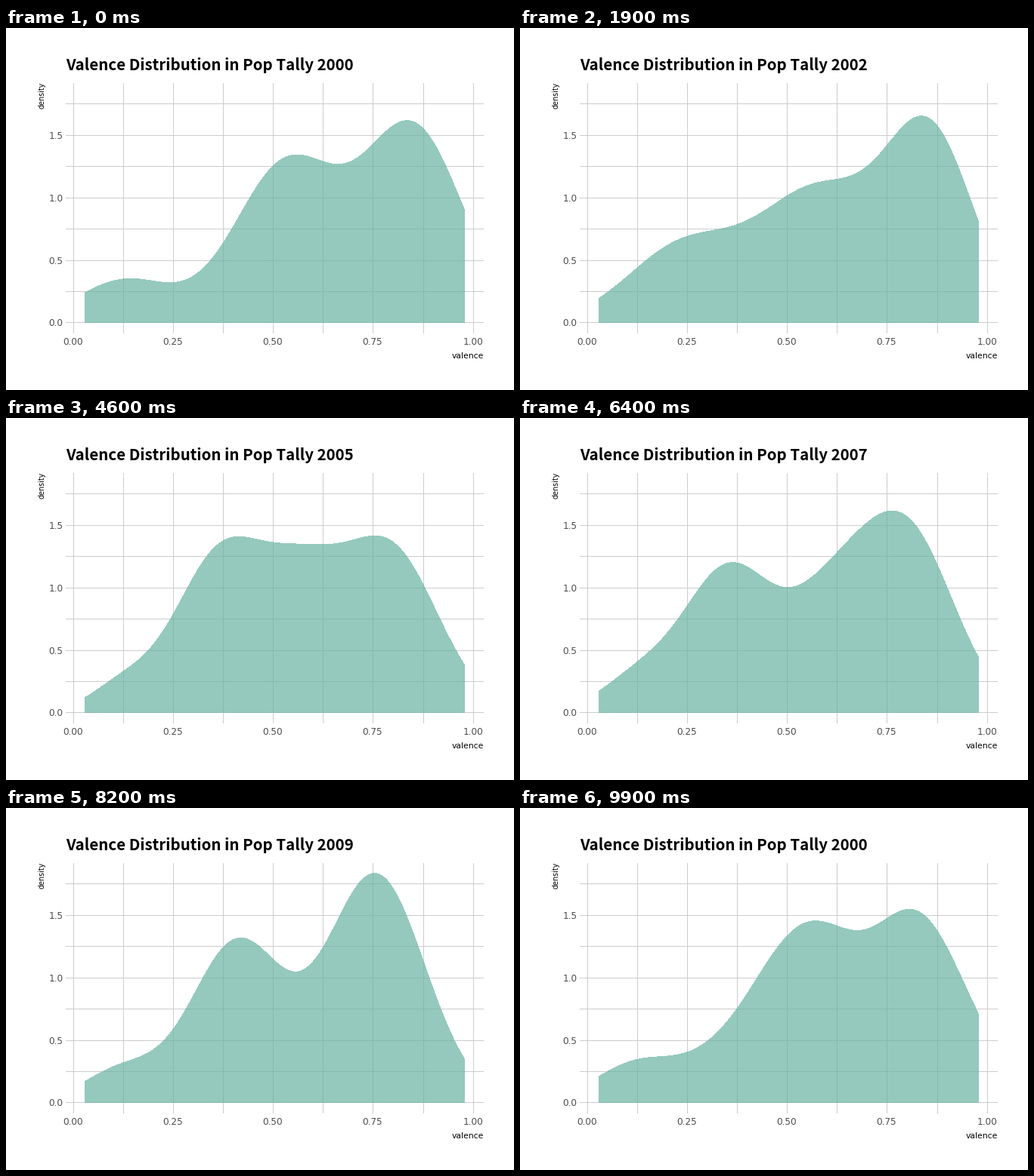
Recreate the animation shown at these times as a matplotlib script. Size 672x480 px, loop 10000 ms.

```python
import numpy as np
import matplotlib.pyplot as plt
from matplotlib.animation import FuncAnimation
from matplotlib.patches import Polygon

W, H, DPI = 672, 480, 100
FRAMES, INTERVAL = 100, 100
X0, X_UNIT = 89.2, 529.0      # pixel of valence 0, pixels per unit
Y0, Y_UNIT = 390.7, 165.7     # pixel of density 0, pixels per unit
TITLE_FONT, LABEL_FONT = "Noto Sans CJK JP", "DejaVu Sans"

# Each density is a sum of bell curves: (height, centre, width)
BELLS = {
    2000: [(.34, .13, .12), (1.27, .535, .13), (1.54, .85, .123)],
    2001: [(.55, .25, .09), (1.2, .56, .14), (1.4, .84, .115)],
    2002: [(.60, .24, .14), (1.04, .58, .15), (1.44, .858, .108)],
    2004: [(.26, .14, .095), (.60, .36, .095), (1.43, .63, .14), (.98, .85, .12)],
    2005: [(.20, .12, .08), (1.26, .37, .115), (.83, .575, .10), (1.3, .79, .12)],
    2007: [(.28, .13, .095), (1.11, .35, .108), (.85, .61, .115), (1.35, .805, .115)],
    2009: [(.26, .12, .095), (1.28, .41, .115), (1.82, .756, .122)],
    2010: [(.17, .11, .07), (.88, .36, .13), (1.58, .60, .115), (1.1, .80, .085)],
}
VALENCE = np.linspace(.028, .978, 512)


def density(year):
    """Sum of bells; years without their own lie midway between neighbours."""
    if year not in BELLS:
        return (density(year - 1) + density(year + 1)) / 2
    return sum(h * np.exp(-((VALENCE - c) / s) ** 2 / 2) for h, c, s in BELLS[year])


YEARS = range(2000, 2011)
DENSITIES = [density(year) for year in YEARS]
STARTS = [5, 15, *range(25, 98, 9)]


def state_at(frame):
    """Density curve and nearest year for a frame."""
    i = int(np.searchsorted(STARTS, frame, side="right")) - 1
    if i < 0:
        return DENSITIES[0], YEARS[0]
    steps = 5 if i < 2 else 4
    t = min(1.0, (frame - STARTS[i] + 1) / steps)
    nxt = (i + 1) % len(YEARS)
    curve = (1 - t) * DENSITIES[i] + t * DENSITIES[nxt]
    return curve, YEARS[nxt if t >= 0.5 else i]


fig = plt.figure(figsize=(W / DPI, H / DPI), dpi=DPI, facecolor="white")
ax = fig.add_axes([0, 0, 1, 1])
ax.set(xlim=(0, W), ylim=(H, 0))
ax.axis("off")


def label(x, y, text, px, color="black", font=LABEL_FONT, **kw):
    return ax.text(x, y, text, fontsize=px * 72 / DPI, color=color,
                   fontfamily=font, va="baseline", **kw)


def grid_line(xs, ys):
    ax.plot(xs, ys, color="#cccccc", lw=72 / DPI, snap=False,
            solid_capstyle="butt", zorder=1)


for i in range(9):
    x = int(X0 + X_UNIT * i / 8) + 0.5
    grid_line([x, x], [73, 405])
    if i % 2 == 0:
        label(x - 0.5, 420, f"{i / 8:.2f}", 12.1, "#4d4d4d", ha="center")
for i in range(8):
    y = int(Y0 + 0.2 - Y_UNIT * i / 4) + 0.5
    grid_line([79, 632], [y, y])
    if i % 2 == 0:
        label(75.5, y + 4.5, f"{i / 4:.1f}", 12.1, "#4d4d4d", ha="right")

label(632.5, 438, "valence", 10.8, ha="right")
label(50.5, 107, "density", 9.6, ha="left", rotation=90, rotation_mode="anchor")
title = label(79, 56, "", 20.45, font=TITLE_FONT, fontweight="bold")
area = ax.add_patch(Polygon([[0, 0], [1, 1], [1, 0]], closed=True, fc="#69b3a2",
                            ec="none", alpha=0.7, antialiased=False, zorder=2))


def update(frame):
    curve, year = state_at(frame)
    xs = X0 + X_UNIT * np.r_[VALENCE, VALENCE[-1], VALENCE[0]]
    ys = Y0 - Y_UNIT * np.r_[curve, 0, 0]
    area.set_xy(np.column_stack([xs, ys]))
    title.set_text(f"Valence Distribution in Pop Tally {year}")
    return area, title


anim = FuncAnimation(fig, update, frames=FRAMES, interval=INTERVAL,
                     repeat=True, repeat_delay=0, blit=False)
plt.show()
```
